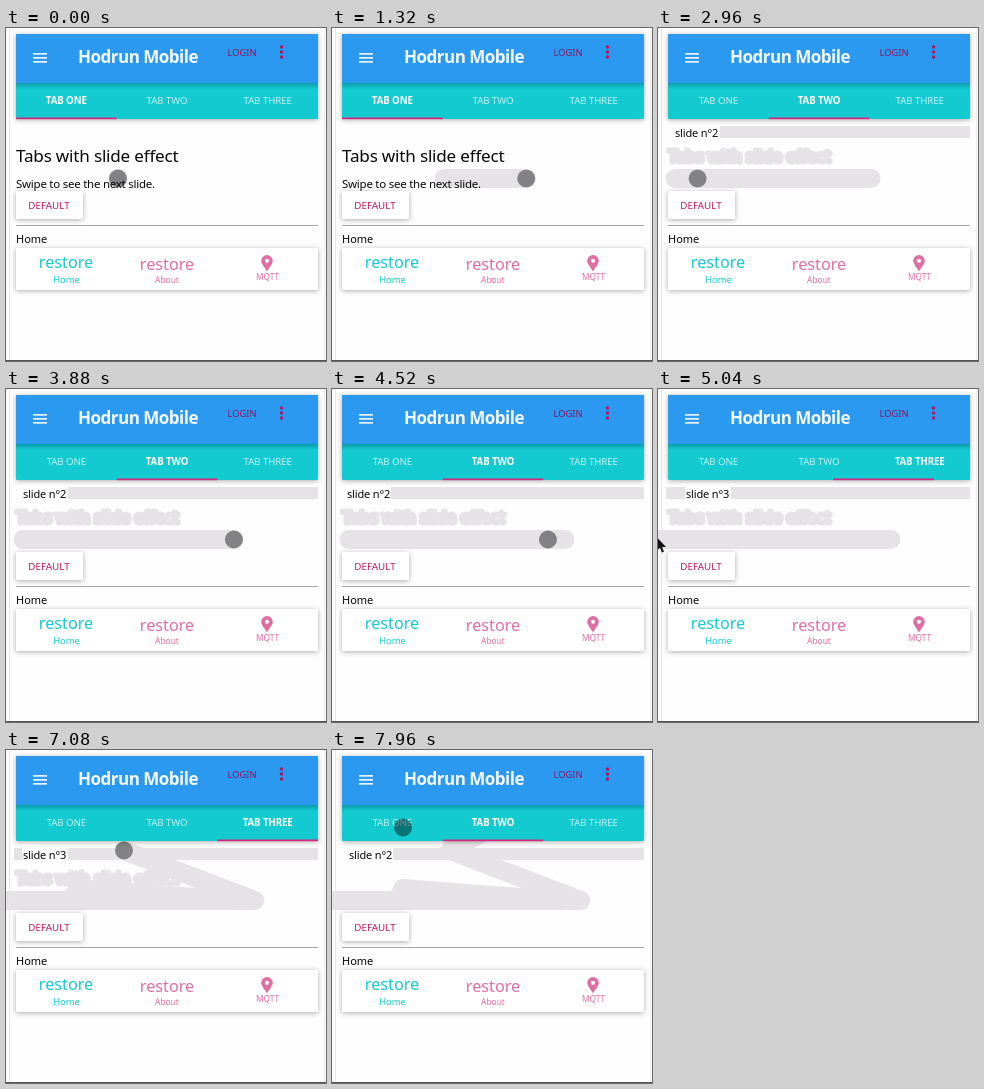
Recreate the animation shown at these times as an HTML page with a canvas. Size 320x333 px, loop 8000 ms.

```html
<!DOCTYPE html>
<html lang="en">
<head>
<meta charset="utf-8">
<title>Tabs with slide effect</title>
<style>
  html, body { margin: 0; width: 100%; height: 100%; overflow: hidden; background: #fdfdfd; }
  canvas { display: block; width: 100vw; height: 100vh; }
</style>
</head>
<body>
<canvas id="stage"></canvas>
<script>
const W = 320, H = 333, LOOP = 8000;
const LEFT = 10, RIGHT = 312, PAGE = RIGHT - LEFT, TAB = PAGE / 3;
const INK = '#080808', PINK = '#b8175c', ROSE = '#df6ea2', TEAL = '#12cad0';
const PAPER = '#fdfdfd', SMEAR = '#e5e3e6';

// Moments at which the slides are let go or a tab is clicked.
const TO_SECOND = 2240, TO_THIRD = 4880, BACK = 7240;

const canvas = document.getElementById('stage');
const ctx = canvas.getContext('2d');
const scale = Math.max(1, window.devicePixelRatio || 1);
canvas.width = W * scale;
canvas.height = H * scale;

// Eases from 0 to 1 between two times.
function glide(t, start, end) {
  const k = Math.min(1, Math.max(0, (t - start) / (end - start)));
  return k * k * (3 - 2 * k);
}

function pointer(t) {
  const swipes = 101 * glide(t, 850, 1500) - 196 * glide(t, 1680, 2220)
    + 216 * glide(t, 2700, 4000) - 234 * glide(t, 4450, TO_THIRD);
  const around = 72 * glide(t, 5300, 6160) + 178 * glide(t, 6200, 6750);
  const toTab = glide(t, 6750, 7080), toLabel = glide(t, 7080, 7250);
  const bump = glide(t, 5950, 6160) - glide(t, 6200, 6700);
  return {
    x: 112 + swipes + around - 131 * toTab + 42 * toLabel - 89 * glide(t, 7500, 7960),
    y: 150.5 - 12 * bump - 50 * toTab - 23 * toLabel
  };
}

// Dragged by the pointer first, then snapping to the page.
function scrollAt(t) {
  return 182 * glide(t, 1700, TO_SECOND) + 120 * glide(t, TO_SECOND, 2520)
    + 240 * glide(t, 4500, TO_THIRD) + 62 * glide(t, TO_THIRD, 5100)
    - PAGE * glide(t, BACK, BACK + 300);
}

function tabAt(t) {
  return glide(t, TO_SECOND, TO_SECOND + 280) + glide(t, TO_THIRD, TO_THIRD + 270)
    - glide(t, BACK, BACK + 300);
}

function rect(x, y, w, h, color) {
  ctx.fillStyle = color;
  ctx.fillRect(x, y, w, h);
}

function disc(x, y, r, color) {
  ctx.fillStyle = color;
  ctx.beginPath();
  ctx.arc(x, y, r, 0, Math.PI * 2);
  ctx.fill();
}

function text(str, x, y, size, color, { weight = 400, align = 'left', spacing = 0, smear = false } = {}) {
  ctx.font = `${weight} ${size}px "Noto Sans", "Open Sans", sans-serif`;
  ctx.letterSpacing = spacing + 'px';
  ctx.textAlign = align;
  ctx.fillStyle = ctx.strokeStyle = color;
  if (smear) {
    ctx.lineWidth = 5;
    ctx.lineJoin = 'round';
    ctx.strokeText(str, x, y);
  }
  ctx.fillText(str, x, y);
}

function card(x, y, w, h, color = '#fff') {
  ctx.save();
  ctx.shadowColor = 'rgba(0,0,0,.32)';
  ctx.shadowBlur = 5 * scale;
  ctx.shadowOffsetY = scale;
  ctx.fillStyle = color;
  ctx.beginPath();
  ctx.roundRect(x, y, w, h, 1);
  ctx.fill();
  ctx.restore();
}

function trail(t) {
  ctx.strokeStyle = SMEAR;
  ctx.lineWidth = 19;
  ctx.lineCap = ctx.lineJoin = 'round';
  ctx.beginPath();
  for (let s = 0; s <= t; s += 20) {
    const { x, y } = pointer(s);
    ctx.lineTo(x, y);
  }
  ctx.stroke();
}

function slides(t) {
  const scroll = scrollAt(t);
  const second = 17 + PAGE - scroll, third = second + PAGE;
  const heading = { spacing: -0.2 };
  ctx.save();
  ctx.beginPath();
  ctx.rect(LEFT - 2, 91, PAGE + 2, 100);
  ctx.clip();
  if (scroll > 0) {
    const start = Math.max(8, Math.min(second + 44, RIGHT));
    rect(start, 98, RIGHT - start, 12, SMEAR);
    if (t < BACK) rect(scroll > PAGE ? third - 1 : second - 1, 97, 46, 14, PAPER);
  }
  if (scroll > 150 && t < BACK) {
    text('Tabs with slide effect', LEFT, 134, 17.1, SMEAR, { ...heading, smear: true });
  }
  text('Tabs with slide effect', LEFT - scroll, 134, 17.1, INK, heading);
  text('Swipe to see the next slide.', LEFT - scroll, 159.5, 11.5, INK, { spacing: -0.25 });
  text('slide n°2', second, 108.5, 11, INK, { spacing: -0.15 });
  text('slide n°3', third, 108.5, 11, INK, { spacing: -0.15 });
  ctx.restore();
}

function header(t) {
  card(LEFT, 6, PAGE, 85, TEAL);
  const shade = ctx.createLinearGradient(0, 55, 0, 61);
  shade.addColorStop(0, 'rgba(0,60,90,.32)');
  shade.addColorStop(1, 'rgba(0,60,90,0)');
  rect(LEFT, 55, PAGE, 6, shade);
  rect(LEFT, 6, PAGE, 49, '#2b99f0');

  for (let i = 0; i < 3; i++) {
    rect(27, 25 + i * 4, 14, 1.7, '#e8f4ff');
    disc(275.5, 19 + i * 5, 1.7, '#ad1764');
  }
  text('Hodrun Mobile', 72, 35, 17, '#f3f9ff', { weight: 600, spacing: -0.5 });
  text('LOGIN', 236, 28, 9.3, '#8b1562', { weight: 500, align: 'center' });

  const tab = tabAt(t);
  ['TAB ONE', 'TAB TWO', 'TAB THREE'].forEach((label, i) => {
    const on = i === Math.round(tab);
    text(label, LEFT + TAB * (i + 0.5), 76, 9.7, on ? '#fff' : 'rgba(255,255,255,.74)',
      { weight: on ? 600 : 500, align: 'center', spacing: -0.1 });
  });
  rect(LEFT + tab * TAB, 89.5, TAB, 1.7, '#d3287f');
}

function marker(x, y) {
  ctx.fillStyle = ROSE;
  ctx.beginPath();
  ctx.moveTo(x, y + 16.5);
  ctx.bezierCurveTo(x - 2, y + 13, x - 5.8, y + 9, x - 5.8, y + 5.8);
  ctx.arc(x, y + 5.8, 5.8, Math.PI, 0);
  ctx.bezierCurveTo(x + 5.8, y + 9, x + 2, y + 13, x, y + 16.5);
  ctx.fill();
  disc(x, y + 5.8, 2.1, '#fff');
}

function footer() {
  const centered = { align: 'center', weight: 500 };
  card(LEFT, 163, 67, 28);
  text('DEFAULT', 43, 180.5, 9.8, PINK, centered);
  rect(LEFT, 197, PAGE, 1, '#a5a5a5');
  text('Home', LEFT, 215, 11, INK);
  card(LEFT, 220, PAGE, 42);
  text('restore', 60, 240, 16.2, TEAL, { align: 'center' });
  text('Home', 60.5, 255, 9.4, TEAL, centered);
  text('restore', 161, 242, 16.2, ROSE, { align: 'center' });
  text('About', 161, 255, 8.4, ROSE, centered);
  marker(261, 227);
  text('MQTT', 261.5, 252, 8.3, ROSE, { align: 'center' });
}

function arrow(x, y) {
  ctx.fillStyle = '#111';
  ctx.fill(new Path2D(`M${x} ${y}v13l3-2.7 2 4.7 2-.8-2-4.6 4-.2z`));
}

function draw(t) {
  ctx.setTransform(scale, 0, 0, scale, 0, 0);
  rect(0, 0, W, H, PAPER);
  trail(t);
  rect(3, 0, 1, 332, '#e6e6e6');
  rect(318, 0, 1, 332, '#ececec');
  rect(0, 332, W, 1, '#555');
  slides(t);
  footer();
  header(t);
  const { x, y } = pointer(t);
  if (x < 5) arrow(x, y - 2);
  else disc(x, y, 9, 'rgba(0,0,0,.43)');
}

const begin = performance.now();
function frame() {
  draw((performance.now() - begin) % LOOP);
  requestAnimationFrame(frame);
}
frame();
</script>
</body>
</html>
```
